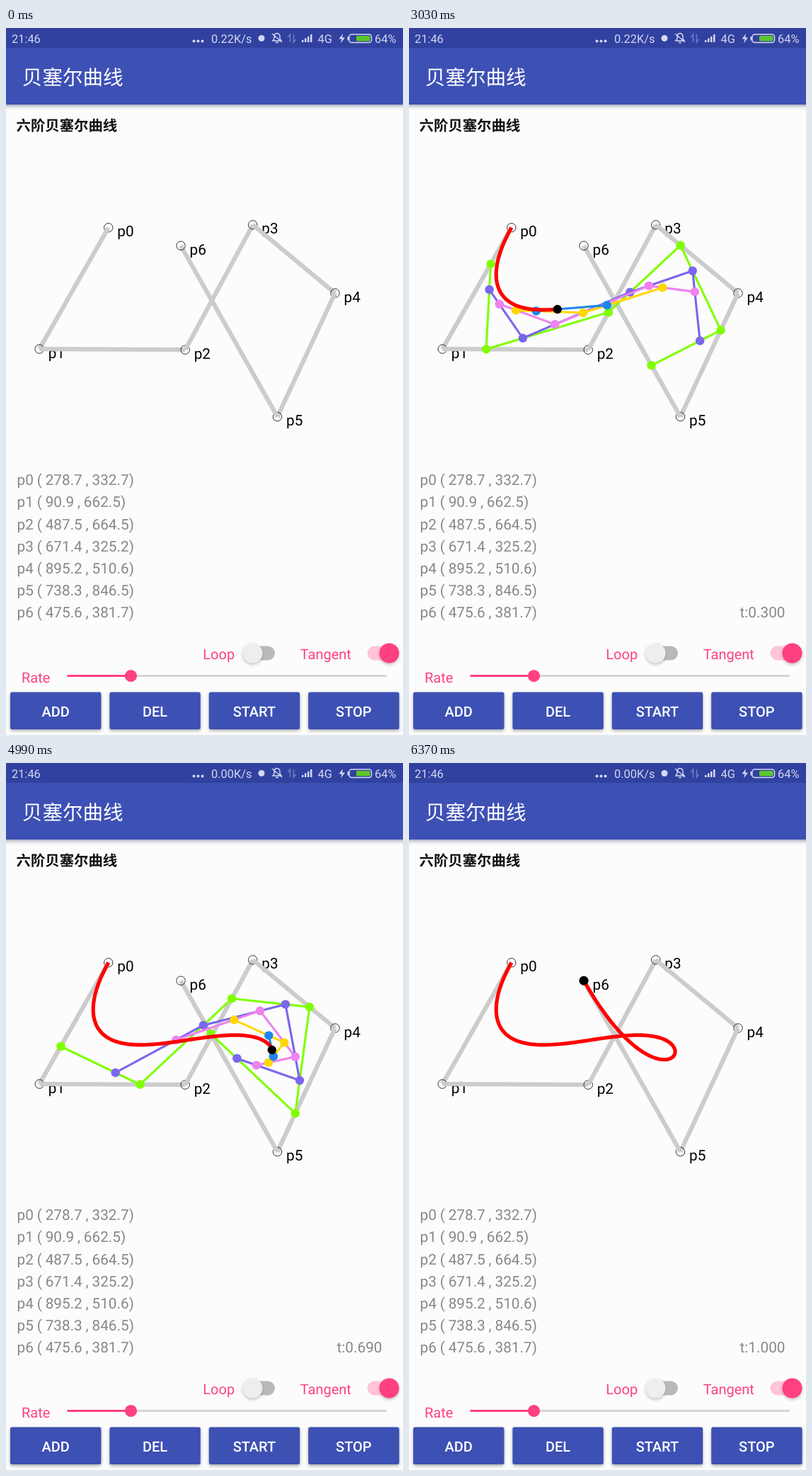
Write an HTML page that moves like this. It is 561 px wide and 998 px high and loops after 6390 ms.

```html
<!DOCTYPE html>
<html lang="zh">
<head>
<meta charset="utf-8">
<title>贝塞尔曲线</title>
<style>
  html, body { margin: 0; width: 100%; height: 100%; overflow: hidden; background: #fcfcfc; }
  svg { display: block; width: 100%; height: 100%; }
  text {
    font-family: Roboto, "Noto Sans CJK SC", "Noto Sans CJK", sans-serif;
    white-space: pre; text-rendering: geometricPrecision;
  }
  .status { font-size: 16.4px; fill: #d3d8f2; }
  .point { font-size: 20.78px; fill: #000; }
  .note { font-size: 20.78px; fill: #888; word-spacing: -.35px; }
  .pink { font-size: 20px; fill: #ff4081; }
  .label { font-size: 20px; font-weight: 500; fill: #fff; text-anchor: middle; }
</style>
</head>
<body>
<svg viewBox="0 0 561 998">
  <defs>
    <linearGradient id="shade" x2="0" y2="1">
      <stop offset="0" stop-color="#555b80" stop-opacity=".5"/>
      <stop offset=".5" stop-color="#777c9c" stop-opacity=".17"/>
      <stop offset="1" stop-color="#888ca8" stop-opacity="0"/>
    </linearGradient>
    <filter id="blur" x="-20%" y="-30%" width="140%" height="170%"><feGaussianBlur stdDeviation="2"/></filter>
  </defs>
  <rect width="561" height="998" fill="#fcfcfc"/>

  <rect y="108" width="561" height="8" fill="url(#shade)"/>
  <rect width="561" height="108" fill="#3d50b4"/>
  <rect width="561" height="28" fill="#31419f"/>
  <text x="22.860" y="80" font-size="28.570" fill="#fff">贝塞尔曲线</text>
  <text x="14.500" y="145" font-size="20.400" font-weight="700" fill="#111">六阶贝塞尔曲线</text>

  <g class="status">
    <text x="8" y="21">21:46</text>
    <text id="speed" x="290" y="21">0.22K/s</text>
    <text x="440.500" y="21">4G</text>
    <text x="521" y="21">64%</text>
    <circle cx="265.500" cy="18.500" r="2"/><circle cx="271.500" cy="18.500" r="2"/><circle cx="277.500" cy="18.500" r="2"/>
    <circle cx="361" cy="14.500" r="4.500"/>
    <path d="M377 18h12l-2-3v-4q-1-3.500-4-3.500t-4 3.500v4zM381 20.500h4M376 8l14 12" fill="none" stroke="#d3d8f2" stroke-width="1.400"/>
    <path d="M401.500 20V9l-3 4M406.500 9v11l3-4" fill="none" stroke="#6e7ac4" stroke-width="1.600"/>
    <path d="M418 17h2.500v3h-2.500zM422 14.500h2.500V20h-2.500zM426 12h2.500v8h-2.500zM430 9h2.500v11h-2.500z"/>
    <path d="M476 8l-5.500 7.500h4l-1.500 6 6-8h-4z"/>
    <rect x="485" y="9" width="31.500" height="11.500" rx="3.500" fill="none" stroke="#d3d8f2" stroke-width="1.500"/>
    <rect x="482.500" y="12" width="2" height="5.500"/>
    <rect x="495" y="11" width="19.500" height="7.500" rx="1.500" fill="#5cc62c"/>
  </g>

  <g id="control"></g>
  <g id="build"></g>

  <text class="pink" x="278.300" y="891">Loop</text>
  <text class="pink" x="415.700" y="891">Tangent</text>
  <text class="pink" x="22" y="924">Rate</text>
  <rect x="335" y="872.500" width="45" height="20" rx="10" fill="#b9b9b7"/>
  <circle cx="348.500" cy="884.500" r="14" fill="#777" opacity=".45" filter="url(#blur)"/>
  <circle cx="348.500" cy="882.500" r="14" fill="#eeeef0"/>
  <rect x="510.500" y="872.500" width="43" height="20" rx="10" fill="#ffc5d7"/>
  <circle cx="541.500" cy="884.500" r="14" fill="#777" opacity=".45" filter="url(#blur)"/>
  <circle cx="541.500" cy="882.500" r="14" fill="#ff4081"/>
  <path d="M177 914.500H538" stroke="#d5d5d8" stroke-width="3"/>
  <path d="M86.500 914.500H177" stroke="#ff4081" stroke-width="3.200"/>
  <circle cx="176.500" cy="914.500" r="8.600" fill="#ff4081"/>
  <g id="buttons"></g>
</svg>
<script>
const LOOP = 6390, SCALE = 561 / 1080, TOP = 109;
const RADIUS = 12 * SCALE;
const COLORS = ['#7fff00', '#7a67ee', '#ee82ee', '#ffd700', '#1c86ee'];
const POINTS = [
  [278.7, 332.7], [90.9, 662.5], [487.5, 664.5], [671.4, 325.2],
  [895.2, 510.6], [738.3, 846.5], [475.6, 381.7]
];
// Curve parameter against screen refresh count
const PROGRESS = [[-7, 0], [8, .13], [30, .3], [59, .57], [83, .79], [103, 1]];

const $ = id => document.getElementById(id);
const clamp = v => Math.max(0, Math.min(1, v));
const line = (a, b, color, w) =>
  `<line x1="${a[0]}" y1="${a[1]}" x2="${b[0]}" y2="${b[1]}" stroke="${color}" stroke-width="${w}"/>`;
const dot = (p, attrs) => `<circle cx="${p[0]}" cy="${p[1]}" r="${RADIUS}" ${attrs}/>`;
const text = (cls, x, y, s) => `<text class="${cls}" x="${x}" y="${y}">${s}</text>`;

const pts = POINTS.map(([x, y]) => [x * SCALE, y * SCALE + TOP]);

$('control').innerHTML = pts.map((p, i) =>
  (i ? line(pts[i - 1], p, '#ccc', 12 * SCALE) : '') +
  dot(p, 'fill="none" stroke="#000" stroke-width=".8"') +
  text('point', p[0] + 2 * RADIUS, p[1] + 2 * RADIUS, 'p' + i) +
  text('note', 15.6, 645.2 + i * 60 * SCALE,
    `p${i} ( ${POINTS[i].map(v => v.toFixed(1)).join(' , ')})`)
).join('');

$('buttons').innerHTML = ['ADD', 'DEL', 'START', 'STOP'].map((name, i) => {
  const x = 6 + i * 140.4;
  const box = (y, attrs) => `<rect x="${x}" y="${y}" width="128.4" height="52.5" rx="2.5" ${attrs}/>`;
  return box(939.5, `id="shadow${i}" fill="#555" opacity=".5" filter="url(#blur)"`) +
    box(937.5, 'fill="#3d50b4"') + text('label', x + 64.2, 972, name);
}).join('');

// One de Casteljau step
const reduce = (list, t) => list.slice(1).map((b, i) =>
  list[i].map((a, k) => a + (b[k] - a) * t));

function at(t) {
  let list = pts;
  while (list.length > 1) list = reduce(list, t);
  return list[0];
}

// Refreshes come in groups of 20, 20 and 100 ms
function refreshCount(ms) {
  const d = ms - 1630 + (ms >= 5760 ? 40 : 0);
  const group = Math.floor(d / 140), rest = d - group * 140;
  return group * 3 + (rest < 20 ? 0 : rest < 40 ? 1 : 2);
}

function progress(ms) {
  const n = refreshCount(ms);
  if (n < PROGRESS[0][0]) return -1;
  const i = PROGRESS.findIndex(p => p[0] >= n);
  if (i < 1) return i ? 1 : 0;
  const [a, u] = PROGRESS[i - 1], [b, v] = PROGRESS[i];
  return Math.round((u + (v - u) * (n - a) / (b - a)) * 100) / 100;
}

function build(t) {
  if (t < 0) return '';
  let out = '', list = pts;
  if (t < 1) {
    for (const color of COLORS) {
      list = reduce(list, t);
      out += list.map((p, i) =>
        (i ? line(list[i - 1], p, color, 6 * SCALE) : '') + dot(p, `fill="${color}"`)).join('');
    }
  }
  const steps = Math.round(t * 100);
  const path = Array.from({ length: steps + 1 }, (_, i) => at(i / 100).map(v => v.toFixed(2)));
  out += `<polyline points="${path.join(' ')}" fill="none" stroke="#f00" stroke-width="${10 * SCALE}" stroke-linejoin="round"/>`;
  return out + dot(at(t), '') + text('note', 467.5, 832.2, 't:' + t.toFixed(3));
}

let shown = null;
function draw(ms) {
  const t = progress(ms);
  if (t !== shown) $('build').innerHTML = build(shown = t);
  $('speed').textContent = ms < 4750 ? '0.22K/s' : '0.00K/s';
  const lift = clamp((ms - 1000) / 150) * clamp((1480 - ms) / 130);
  $('shadow2').setAttribute('y', 939.5 + 4 * lift);
}

const start = performance.now();
function tick() {
  draw((performance.now() - start) % LOOP);
  requestAnimationFrame(tick);
}
tick();
</script>
</body>
</html>
```
